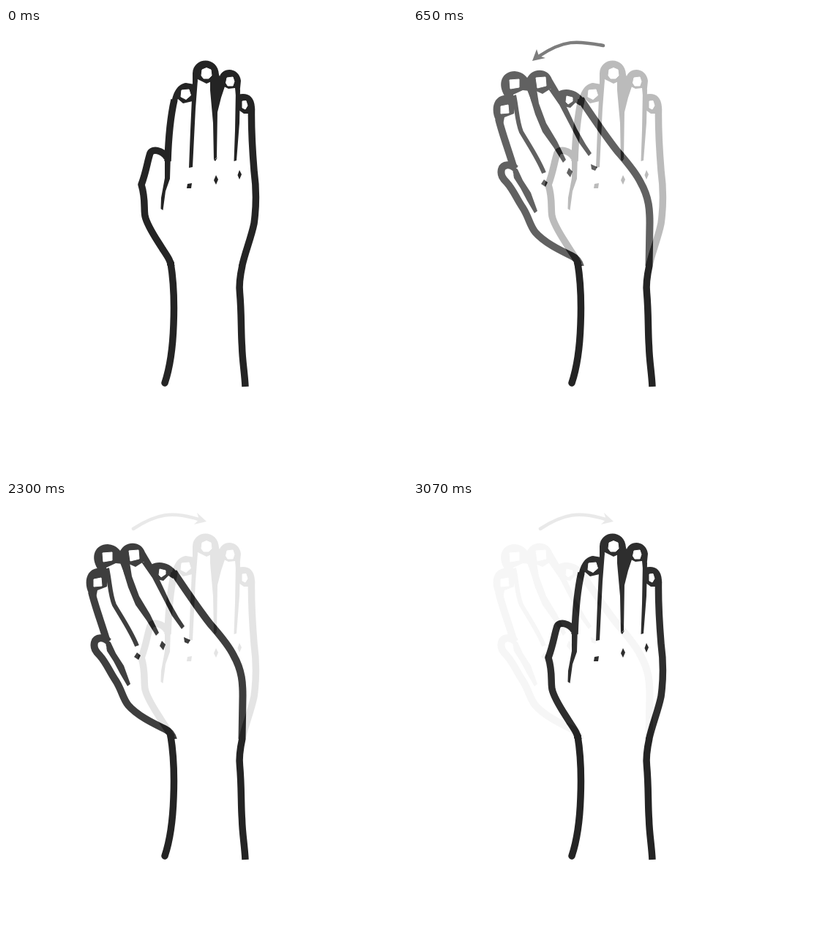
Write an HTML page that moves like this. It is 548 px wide and 608 px high and loops after 3100 ms.

```html
<!DOCTYPE html>
<html lang="en">
<head>
<meta charset="utf-8">
<title>Waving hand</title>
<style>
  html, body { margin: 0; width: 100%; height: 100%; overflow: hidden; background: #fff; }
  /* Drawn in negative, so that crossfading layers add up where they overlap. */
  svg { display: block; width: 548px; height: 608px; background: #000; filter: brightness(.86) invert(1); }
  svg > g { mix-blend-mode: plus-lighter; }
  .line { fill: none; stroke: #fff; stroke-width: 9.5; stroke-linejoin: round; }
  #tilted .line { stroke-width: 10; }
  #tilted .thin { stroke-width: 6; }
  .ink { fill: #fff; }
  .nail { fill: #000; stroke: #000; stroke-linejoin: round; }
  .arrow path { fill: none; stroke: #d2d2d2; stroke-width: 4.5; stroke-linecap: round; }
  .arrow polygon { fill: #d2d2d2; }
</style>
</head>
<body>
<svg viewBox="0 0 548 608">
  <clipPath id="wrist"><path d="M0 0H548V325H0Z"/></clipPath>

  <g class="line">
    <path d="M225 321C229 345 230 380 229 405C228 435 224 464 217 485" stroke-linecap="round"/>
    <path d="M323 324C320 338 318 350 319.500 362C322 390 321 415 322.500 435C323 455 326 470 327 490"/>
  </g>

  <g id="upright" clip-path="url(#wrist)">
    <path class="line" d="M220 177C213 166 200 165 197 171C193 183 192 195 185 214C191 234 188 246 190 257C193 271 206 289 214 302C222 314 225 318 226 328"/>
    <path class="line" d="M221 182C222 150 225 120 230 98"/>
    <path class="line" d="M335.500 110C335 140 337 170 339 195C343 225 342 245 339 267C335 287 326 308 322 328"/>
    <g class="ink">
      <path d="M217 172H225L224 206 218 223 214.500 249 211.500 247 212 232 217 205Z"/>
      <path d="M226 103C228 88 235 76 246 75L257 77 255 100 242 103 235 97 232 104Z"/>
      <path d="M255 77V62C256 39 290 38 291 64L283 72 274 76 262 70 260 80Z"/>
      <path d="M255 75L262 71 259 110 257 150 255 190 250 191 252 140Z"/>
      <path d="M279 72L290 62 299 80 294 95 289 115 288 177 284 180 283 130 279 85Z"/>
      <path d="M291 70C293 53 318 52 321 72L319 92 314 92 313 82 304 83 296 79Z"/>
      <path d="M314 84H320L319 130 315 181 311.500 182 313 140Z"/>
      <path d="M317 91C329 88 339 92 340 108V125H331V117L325 117 318 112Z"/>
      <path d="M248 213L254 212 253 219 247 219ZM287 201L290 207 287 214 284 208ZM319 194L322 200 319 207 316.500 201ZM284 180L289 177 286 182Z"/>
    </g>
    <g class="nail">
      <path d="M240 85L250 84 252.500 92 246 97.500 239 94Z"/>
      <path d="M268 57L274 54.500 280 57 281 65 277 69 270 69 267 65Z"/>
      <path d="M302 68L310 67 312 73 310 79 303 79 300.500 75Z"/>
      <path d="M323 100L328 99.500 330 106 327 111 323 109Z"/>
    </g>
  </g>

  <g id="tilted" clip-path="url(#wrist)">
    <path class="line" d="M140 192C134 185 123 186 121 193C119 201 123 206 128 211C137 221 141 232 149 244C158 257 159 269 167 279C181 295 206 306 218 312C224 315 227 319 229 326"/>
    <path class="line" d="M138 192C131 168 122 145 117 124"/>
    <path class="line" d="M229 97C243 118 262 146 279 168C291 182 303 195 311 211C323 232 323.500 250 323.500 266L322.500 326"/>
    <path class="line thin" d="M138 92C142 110 142 128 148 142C158 159 171 178 179 198"/>
    <g class="ink">
      <path d="M135 187L143 193 150 208 161 225 170 250 166 253 156 236 147 219 138 205Z"/>
      <path d="M155 82L169 84 172 103 182 130 197 155 209 180 205 184 192 163 177 142 167 118 160 95Z"/>
      <path d="M184 82L199 88 211 110 224 138 236 159 244 171 240 175 227 157 213 130 200 105Z"/>
      <path d="M113 126C107 114 108 95 124 92L140 93 138 117 125 122 123 132Z"/>
      <path d="M126 94C114 76 122 59 139 59C152 60 157 68 160 76L160 86 150 85 137 91 137 100Z"/>
      <path d="M154 74C158 54 184 52 190 70L200 87 207 108 199 103 188 83 177 90 168 86 162 101Z"/>
      <path d="M198 87C209 81 225 84 235 99L228 106 222 102 215 109 206 107Z"/>
      <path d="M179 207L184 211 181 217 175 213ZM213 191L218 196 215 204 210 198ZM243 186L252 190 249 195 244 193Z"/>
    </g>
    <g class="nail">
      <path d="M120 107L130 105 131 116 120 117Z"/>
      <path d="M132 71L145 70 145 81 133 83Z"/>
      <path d="M168 68L181 67 182 79 170 82Z"/>
      <path d="M210 93L218 95 218 100 212 104 209 101Z"/>
      <path d="M128 197L137 199 134 208Z"/>
    </g>
  </g>

  <g id="left" class="arrow">
    <path d="M260 24C224 17 206 16 173 38"/>
    <polygon points="163,45 169,29 172,38 181,41"/>
  </g>
  <g id="right" class="arrow">
    <path d="M174 38C206 17 227 14 263 25"/>
    <polygon points="274,28 257,32 264,25 261,16"/>
  </g>
</svg>
<script>
  const LOOP = 3100, STEP = 30, STEPS = 6;
  const start = performance.now();

  const show = (id, opacity) => {
    document.getElementById(id).style.opacity = Math.max(0, Math.min(1, opacity));
  };

  function draw(now) {
    const time = Math.max(0, now - start) % LOOP;
    const fade = from => Math.max(0, Math.min(STEPS, Math.floor((time - from) / STEP) + 1)) / STEPS;
    const leave = fade(500), tilt = fade(1650), back = fade(2300), settle = fade(2950);

    show('upright', 1 - .69 * leave - .31 * tilt + .72 * back + .28 * settle);
    show('tilted', .72 * leave + .28 * tilt - .73 * back - .27 * settle);
    show('left', .72 * (leave - tilt));
    show('right', .72 * (back - settle));
    requestAnimationFrame(draw);
  }
  draw(start);
</script>
</body>
</html>
```
